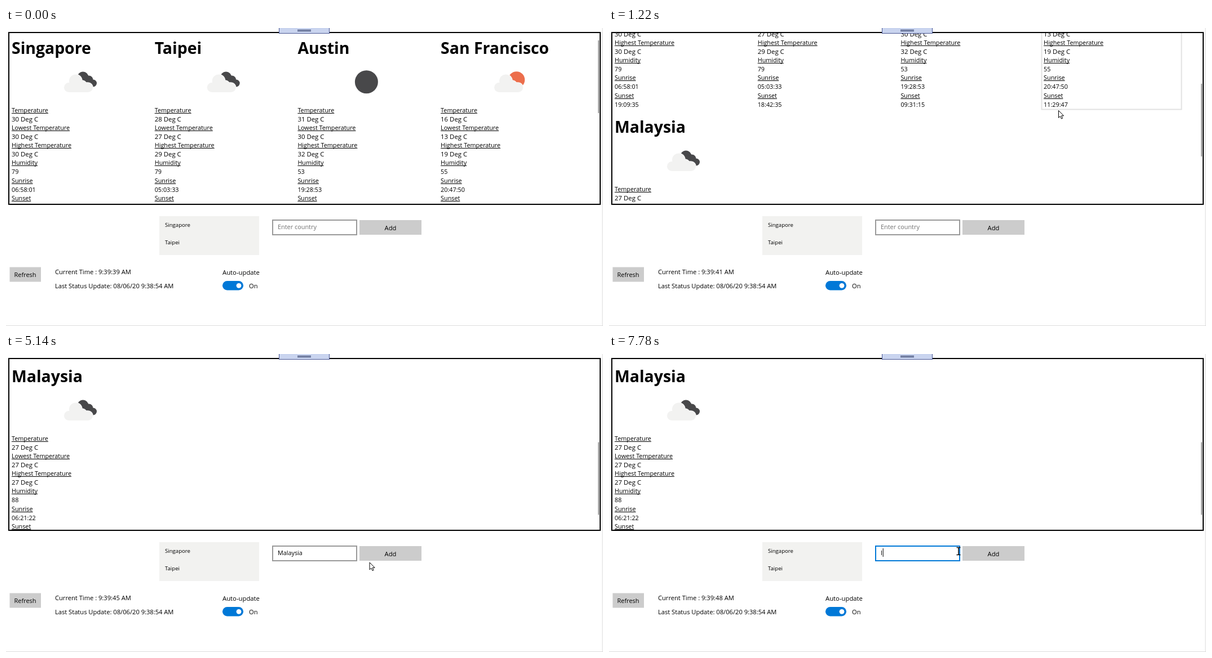
Recreate the animation shown at these times as an HTML page with a canvas. Size 1059x529 px, loop 8000 ms.

```html
<!DOCTYPE html>
<html lang="en">
<head>
<meta charset="utf-8">
<title>Weather dashboard</title>
<style>
  html, body { margin: 0; width: 100%; height: 100%; overflow: hidden; background: #fff; }
  canvas { display: block; width: 1059px; height: 529px; }
</style>
</head>
<body>
<canvas id="stage"></canvas>
<script>
const W = 1059, H = 529, LOOP = 8000, STEP = 78;
const ACCENT = '#0078d7', DARK = '#48484a';
const canvas = document.getElementById('stage');
const ctx = canvas.getContext('2d');
const dpr = window.devicePixelRatio || 1;
canvas.width = W * dpr;
canvas.height = H * dpr;

const labels = ['Temperature', 'Lowest Temperature', 'Highest Temperature', 'Humidity', 'Sunrise', 'Sunset'];
const cities = [
  { name: 'Singapore', icon: 'cloudy', temps: [30, 30, 30], rest: ['79', '06:58:01', '19:09:35'] },
  { name: 'Taipei', icon: 'cloudy', temps: [28, 27, 29], rest: ['79', '05:03:33', '18:42:35'] },
  { name: 'Austin', icon: 'clear', temps: [31, 30, 32], rest: ['53', '19:28:53', '09:31:15'] },
  { name: 'San Francisco', icon: 'sunny', temps: [16, 13, 19], rest: ['55', '20:47:50', '11:29:47'] },
  { name: 'Malaysia', icon: 'cloudy', temps: [27, 27, 27], rest: ['88', '06:21:22', '19:20:10'] }
];

// Keys are [time, value, ...]
const scrollKeys = [[684, 0], [918, 74.5], [1074, 138], [1230, 182], [1308, 182], [1464, 262], [1620, 306], [1698, 318]];
const pointerKeys = [
  [60, 806, 468], [138, 803, 300], [216, 799, 163], [420, 799, 160], [512, 797.5, 146.5],
  [1690, 797.5, 146.5], [2085, 581, 351], [2390, 581, 351], [2625, 615, 270],
  [4600, 615, 270], [4970, 645, 370], [5280, 645, 370], [5920, 763.5, 283],
  [6300, 763.5, 283], [6915, 620, 350]
];
const tickTimes = [420, 1450, 2470, 3470, 4490, 5560, 6560, 7620];
const typeTimes = [3230, 3400, 3470, 3640, 3710, 3880, 4030, 4110];

const passed = (times, t) => times.filter(k => k <= t).length;
const ramp = (t, a, b) => Math.min(1, Math.max(0, (t - a) / (b - a)));

function track(keys, t) {
  const next = keys.findIndex(k => k[0] > t);
  if (next === 0) return keys[0].slice(1);
  if (next < 0) return keys[keys.length - 1].slice(1);
  const a = keys[next - 1], b = keys[next], u = ramp(t, a[0], b[0]);
  return a.slice(1).map((v, i) => v + (b[i + 1] - v) * u);
}

function box(x, y, w, h, fill, stroke, line = 2) {
  if (fill) {
    ctx.fillStyle = fill;
    ctx.fillRect(x, y, w, h);
  }
  if (stroke) {
    ctx.strokeStyle = stroke;
    ctx.lineWidth = line;
    ctx.strokeRect(x + line / 2, y + line / 2, w - line, h - line);
  }
}

function text(str, x, y, size = 10.8, color = '#000', weight = 400, align = 'left') {
  ctx.font = `${weight} ${size}px "Open Sans", "Noto Sans", sans-serif`;
  ctx.fillStyle = color;
  ctx.textAlign = align;
  ctx.fillText(str, x, y);
  return ctx.measureText(str).width;
}

function disc(x, y, r, color) {
  ctx.fillStyle = color;
  ctx.beginPath();
  ctx.arc(x, y, r, 0, Math.PI * 2);
  ctx.fill();
}

function pill(x, y, w, h, color) {
  ctx.fillStyle = color;
  ctx.beginPath();
  ctx.roundRect(x, y, w, h, h / 2);
  ctx.fill();
}

function frontCloud(x, y) {
  const shape = (grow, color) => {
    disc(x + 20.5, y - 2, 11.5 + grow, color);
    disc(x + 32, y + 5, 8 + grow, color);
    pill(x - grow, y + 1 - grow, 51 + grow * 2, 17 + grow * 2, color);
  };
  shape(0.7, '#fff');
  shape(0, '#f2f2f1');
}

function icon(kind, x, y) {
  if (kind === 'clear') return disc(x, y - 0.3, 20.5, DARK);
  if (kind === 'sunny') {
    disc(x + 12.5, y - 4, 14.7, '#ec6e4c');
    return frontCloud(x - 27, y);
  }
  disc(x + 4.5, y - 8.5, 10, DARK);
  disc(x + 15, y - 4, 7.5, DARK);
  disc(x + 22.5, y + 2, 6.5, DARK);
  frontCloud(x - 29, y);
}

function cityCard(city, x, y) {
  text(city.name, x, y + 46, 28.4, '#000', 700);
  icon(city.icon, x + 122, y + 96);
  labels.forEach((label, i) => {
    const base = Math.round(y + 149.7 + i * 31.2);
    const width = text(label, x, base);
    box(x, base + 1, width, 1, '#000');
    if (i < 3) text(city.temps[i] + ' Deg C', x, base + 15.6, 11.4);
    else text(city.rest[i - 3], x, base + 15.6);
  });
}

function weatherPanel(t) {
  const [scroll] = track(scrollKeys, t);
  ctx.save();
  ctx.beginPath();
  ctx.rect(6, 9, 1047, 303);
  ctx.clip();
  cities.forEach((city, i) => cityCard(city, 10 + (i % 4) * 253.7, Math.floor(i / 4) * 322 - scroll));
  if (t > 130 && t < 1700) box(766.5, 9 - scroll, 250, 318.5, null, '#e2e2e2');
  box(1050.3, 22 + scroll * 0.423, 1.6, 129, '#7d7d7d');
  ctx.restore();
  box(4, 7, 1051, 307, null, '#000');
  box(484, -2, 90, 12, '#c9d4ef', '#4a5794', 1);
  box(517, 3, 24, 1, '#27345f');
  box(517, 5, 24, 1, '#27345f');
}

function inputText(t) {
  if (t >= 7770) return 'I';
  return t < 5200 ? 'Malaysia'.slice(0, passed(typeTimes, t)) : '';
}

function controls(t, overInput) {
  box(272, 334, 177, 69, '#f2f2f0');
  text('Singapore', 282, 352.5, 9.6);
  text('Taipei', 282, 383.5, 9.6);

  const focused = (t > 2390 && t < 5120) || t > 6850;
  box(472, 340, 151, 28, '#fff', focused ? ACCENT : overInput ? '#666' : '#999');
  const typed = inputText(t);
  const width = typed ? text(typed, 482, 357) : 0;
  if (!typed) text('Enter country', 482, 357, 10.9, '#707070');
  if (focused) box(482 + width + 0.7, 345, 1, 15, '#000');

  const hover = t > 4830 && t < 5120, pressed = hover && t > 4960;
  box(627, 341, 110, 26, pressed ? '#999' : '#ccc', hover && !pressed ? '#7a7a7a' : null);
  text('Add', 682, 358.5, 11.2, '#000', 400, 'center');
  box(6.5, 424.5, 55.5, 26, '#ccc');
  text('Refresh', 34, 442, 11, '#000', 400, 'center');

  const ticks = passed(tickTimes, t);
  text(`Current Time : 9:39:${ticks ? 40 + ticks : 39} AM`, 87, 437, 11.15);
  text('Last Status Update: 08/06/20 9:38:54 AM', 87, 462, 11.15);
  text('Auto-update', 384, 437.5, 11.3);
  pill(384, 449, 37, 16.5, ACCENT);
  disc(413, 457.3, 4.4, '#fff');
  text('On', 431, 462, 11.1);
}

function dialog(t, overClose) {
  const alpha = Math.min(ramp(t, 5150, 5360), 1 - ramp(t, 6220, 6400));
  if (!alpha) return;
  ctx.save();
  ctx.globalAlpha = alpha;
  ctx.shadowColor = 'rgba(0,0,0,.35)';
  ctx.shadowBlur = 7 * dpr;
  ctx.shadowOffsetY = dpr;
  box(245, 181, 569, 125, '#fff');
  ctx.shadowColor = 'transparent';
  box(245, 181, 569, 125, null, '#8c8c8c', 1);
  text('Country already exists', 265, 235, 11.2);
  const pressed = t > 6050 && t < 6140;
  box(718, 258.5, 75, 26.5, pressed ? '#005a9e' : overClose ? '#3b95df' : ACCENT, overClose ? '#005a9e' : null);
  text('Close', 755.5, 276.5, 11.5, '#fff', 600, 'center');
  ctx.restore();
}

function pointer(x, y, beam) {
  ctx.save();
  ctx.translate(x, y);
  ctx.lineWidth = beam ? 1.5 : 1;
  ctx.strokeStyle = '#000';
  ctx.fillStyle = '#fff';
  const path = new Path2D(beam
    ? 'M-3.5-6.5H-1Q0-6.5 0-5.5Q0-6.5 1-6.5H3.5M0-6V6M-3.5 6.5H-1Q0 6.5 0 5.5Q0 6.5 1 6.5H3.5'
    : 'M0 0V12.8L2.9 10.1L5 14.6L7.1 13.7L5.1 9.3H9.1Z');
  if (!beam) ctx.fill(path);
  ctx.stroke(path);
  ctx.restore();
}

function draw(now) {
  // The picture refreshes at about 13 frames per second.
  const t = Math.floor((now % LOOP - 44) / STEP) * STEP + 60;
  const [px, py] = track(pointerKeys, t);
  const over = (x, y, w, h) => px >= x && px <= x + w && py >= y && py <= y + h;
  const overInput = over(472, 340, 151, 28);
  ctx.setTransform(dpr, 0, 0, dpr, 0, 0);
  box(0, 0, W, H, '#fff');
  box(1057.5, 0, 1, H, '#dcdcdc');
  box(0, 528, W, 1, '#dcdcdc');
  weatherPanel(t);
  controls(t, overInput);
  dialog(t, over(718, 258, 75, 27));
  if (t >= 60) pointer(px, py, overInput);
  requestAnimationFrame(() => draw(performance.now()));
}
draw(performance.now());
</script>
</body>
</html>
```
